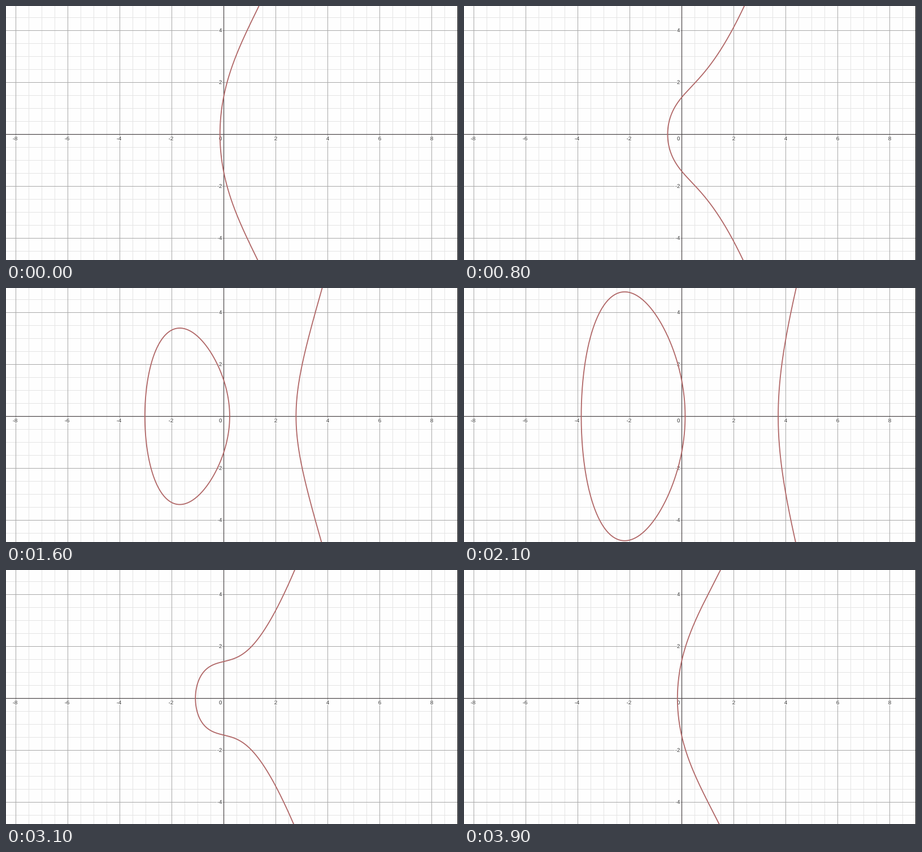
These frames come from a looping animation (800 px wide and 450 px high, 4000 ms). A matplotlib script:

```python
import numpy as np
import matplotlib.pyplot as plt
import matplotlib.patheffects as pe
from matplotlib.animation import FuncAnimation

W, H, DPI = 800, 450, 100
PX = 72 / DPI              # points per pixel
OX, OY, UNIT = 385.5, 227.5, 46
FRAMES, INTERVAL = 40, 100
B = 2                      # constant term of y^2 = x^3 + a x + B

fig = plt.figure(figsize=(W / DPI, H / DPI), dpi=DPI, facecolor="#fefefe")
ax = fig.add_axes([0, 0, 1, 1])
ax.set_xlim(0, W)
ax.set_ylim(H, 0)
ax.axis("off")


def rule(x, y, color, width, z):
    ax.plot(x, y, color=color, lw=width * PX, zorder=z, snap=False)


def grid(step, color, z):
    for k in range(-20, 21):
        x, y = OX + k * step, OY + k * step
        if 0 < x < W:
            rule([x, x], [0, H], color, 1, z)
        if 0 < y < H:
            rule([0, W], [y, y], color, 1, z)


def label(x, y, value, ha):
    ax.text(x, y, str(value), ha=ha, va="center_baseline", zorder=4,
            family="Liberation Sans", size=9.5 * PX, color="#333333",
            path_effects=[pe.withStroke(linewidth=2.5 * PX, foreground="#fefefe")])


grid(UNIT / 2, "#e4e4e4", 1)
grid(UNIT * 2, "#a8a8a8", 2)
rule([OX, OX], [0, H], "#4a4446", 1.2, 3)
rule([0, W], [OY, OY], "#4a4446", 1.2, 3)
ax.fill_between([W - 1, W], 0, H, color="black", lw=0, zorder=6)

for n in range(-8, 9, 2):
    if n:
        label(OX + n * UNIT - (1.5 if n < 0 else 0), 234.5, n, "center")
for n in (-4, -2, 2, 4):
    label(382.3, OY - n * UNIT - 0.8, n, "right")
label(382.3, 234.5, 0, "right")

curve, = ax.plot([], [], color="#b06666", lw=1.8 * PX, zorder=5)


def coefficient(i):
    """Linear sweep down and back up, reflected at 15."""
    a = max(3.45 - 1.494 * (i - 8), -5.34 + 1.505 * (i - 27))
    return 15 - abs(15 - a)


def mirrored(x, a):
    y = np.sqrt(np.maximum(x**3 + a * x + B, 0))
    return np.r_[x[::-1], x, np.nan], np.r_[y[::-1], -y, np.nan]


def update(i):
    a = coefficient(i)
    roots = np.roots([1, 0, a, B])
    roots = np.sort(roots[np.abs(roots.imag) < 1e-7].real)
    s = np.linspace(0, 1, 300)
    xs, ys = mirrored(roots[-1] + (6 - roots[-1]) * s**2, a)
    if len(roots) == 3:
        left, right = roots[:2]
        ox, oy = mirrored(left + (right - left) * (1 - np.cos(np.pi * s)) / 2, a)
        # close the oval at its right end
        ox, oy = np.r_[ox[:-1], ox[0], np.nan], np.r_[oy[:-1], oy[0], np.nan]
        xs, ys = np.r_[ox, xs], np.r_[oy, ys]
    curve.set_data(OX - 0.5 + UNIT * xs, OY - 0.2 - UNIT * ys)
    return curve,


anim = FuncAnimation(fig, update, frames=FRAMES, interval=INTERVAL,
                     repeat=True, repeat_delay=0)
plt.show()
```
